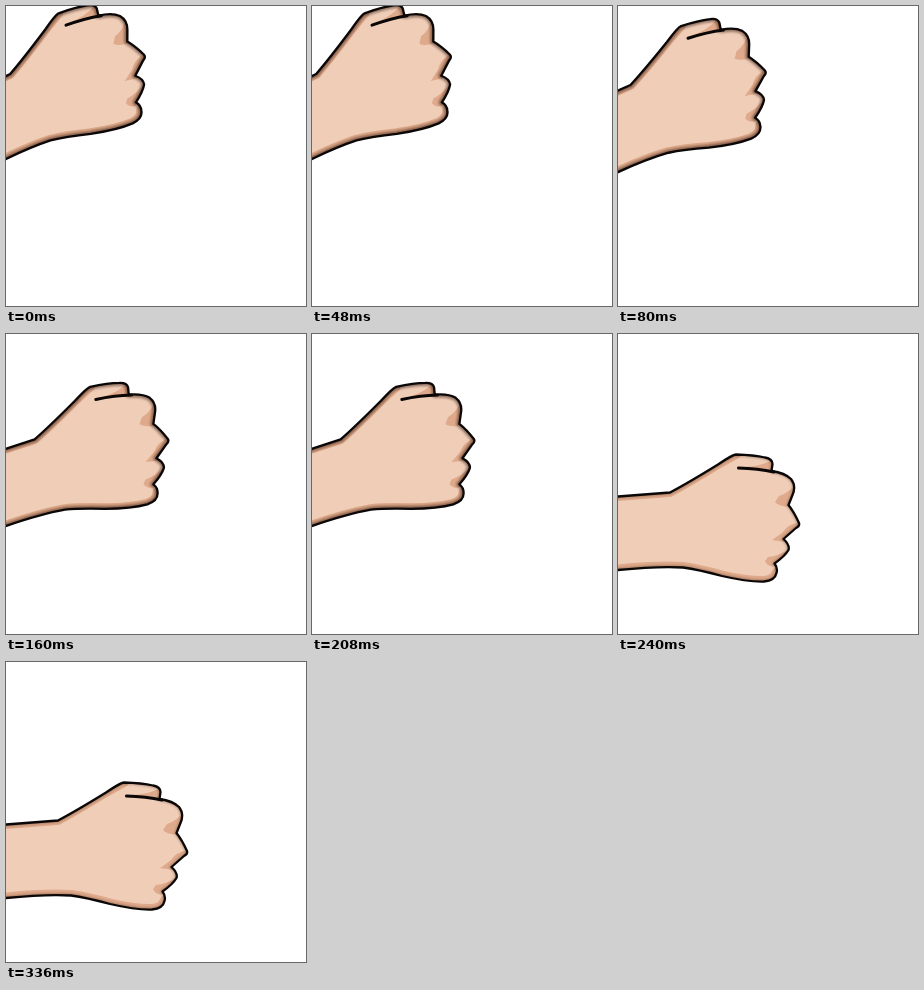
An HTML page for the animation above (400 ms loop, 300 by 300 pixels).

```html
<!DOCTYPE html>
<html lang="en">
<head>
<meta charset="utf-8">
<title>Fist pump</title>
<style>
  html, body { margin: 0; width: 100%; height: 100%; overflow: hidden; background: #fff; }
  svg { display: block; width: 100vw; height: 100vh; }
  path { stroke-linejoin: round; stroke-linecap: round; }
</style>
</head>
<body>
<svg viewBox="0 0 300 300">
  <defs>
    <path id="hand" d="M-70 167 L0 162.500 L52 158.500 Q70 149 100 130.500 Q114 121 118 120.500
      Q136 121 147 123.500 Q154.500 125 154.500 130 L153.500 137 Q167 139 173 145 Q178.500 152 174.500 161 L170.500 171
      Q176 178 181 189 Q182 192 178 194 L165.500 205 Q172 211 170.500 216 Q167 222 156.500 229.500
      Q160 234 158.500 239 Q157 246.500 146 247.500 Q130 248 104 242 Q80 235.500 65 233.500 Q40 232 0 236 L-70 242"/>
    <clipPath id="inside"><use href="#hand"/></clipPath>
    <filter id="soft" x="-20%" y="-20%" width="140%" height="140%"><feGaussianBlur stdDeviation="1"/></filter>
  </defs>
  <g id="arm">
    <use href="#hand" fill="#efcdb7"/>
    <g clip-path="url(#inside)">
      <g fill="none" stroke="#dfaa8b">
        <path d="M-70 167 L0 162.500 L52 158.500 Q70 149 100 130.500 L118 120.500" stroke-width="9"/>
        <path d="M159 239 Q157 246.500 146 247.500 Q130 248 104 242 Q80 235.500 65 233.500 Q40 232 0 236 L-70 242" stroke-width="11"/>
      </g>
      <g fill="#dfaa8b">
        <path d="M128 133 Q142 132 150 128 L156 126 L154 138 Z"/>
        <path d="M178 149 Q171 159 161 162 L157 168 Q160 172 171 173 Z"/>
        <path d="M182 188 Q170 190 165 198 Q160 202 154 206 L167 208 Z"/>
        <path d="M172 215 Q160 222 150 223 L147 227 Q150 234 158 232 Z"/>
      </g>
      <use id="glow" href="#hand" fill="none" stroke="#301408" filter="url(#soft)"/>
    </g>
    <g fill="none" stroke="#0b0706">
      <use href="#hand" stroke-width="2.3"/>
      <path d="M120.500 134 Q140 134.500 156 138" stroke-width="3"/>
    </g>
  </g>
</svg>
<script>
  // Each pose places the start of the thumb crease (121, 134) and tilts the arm around it.
  const poses = [
    { x: 60.5, y: 19, tilt: -21.5, scale: 1.02 },
    { x: 70.5, y: 32, tilt: -19.5, scale: 1.02 },
    { x: 90.3, y: 65.3, tilt: -13.5, scale: 1.005 },
    { x: 121, y: 134, tilt: 0, scale: 1 }
  ];
  const STEP = 80, LOOP = 400;
  const arm = document.getElementById('arm');
  const glow = document.getElementById('glow');

  function draw() {
    const step = Math.floor(performance.now() % LOOP / STEP);
    const { x, y, tilt, scale } = poses[Math.min(step, poses.length - 1)];
    arm.setAttribute('transform',
      `translate(${x} ${y}) rotate(${tilt}) scale(${scale}) translate(-121 -134)`);
    // The shadow inside the outline is heavier while the arm swings.
    glow.setAttribute('stroke-width', tilt ? 6 : 4);
    glow.setAttribute('opacity', tilt ? 0.5 : 0.3);
    requestAnimationFrame(draw);
  }
  draw();
</script>
</body>
</html>
```
